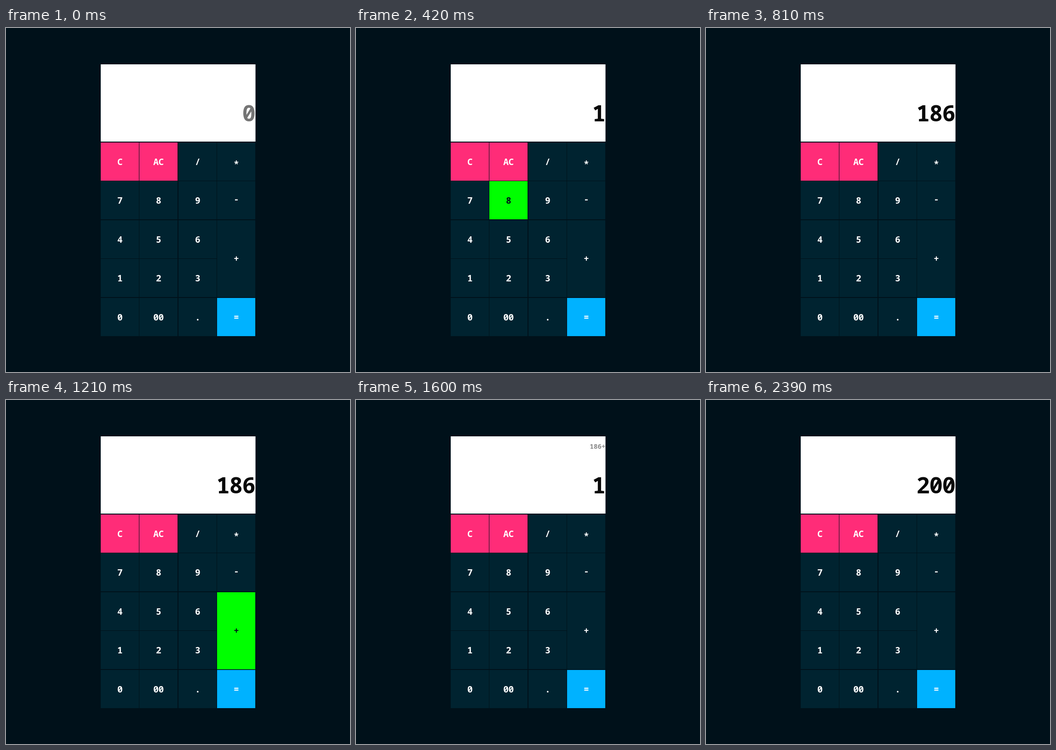
An HTML page that plays this animation: 748 by 748 pixels, repeating every 2790 ms.

```html
<!DOCTYPE html>
<html lang="en">
<head>
<meta charset="utf-8">
<title>Calculator</title>
<style>
  html, body { margin: 0; width: 100%; height: 100%; overflow: hidden; background: #00111a; }
  svg { display: block; width: 100vw; height: 100vh; }
  text { font: bold 19.5px "Noto Sans Mono", monospace; letter-spacing: -.027em; }
  .key rect { fill: #002330; }
  .key text { fill: #fff; text-anchor: middle; }
  .key.clear rect { fill: #ff2c78; }
  .key.equals rect { fill: #00b2ff; }
  .key.down rect { fill: #0f0; }
  .key.down text { fill: #00111a; }
  #total, #entry { text-anchor: end; }
  #total { font-size: 14.7px; fill: #8c8c8c; }
  #entry { font-size: 49px; fill: #0a0a0a; }
  #entry.empty { fill: #757575; }
</style>
</head>
<body>
<svg viewBox="0 0 748 748">
  <rect x="206" y="79" width="336.5" height="168" fill="#fff"/>
  <text id="total" x="542" y="106"></text>
  <text id="entry" x="541.7" y="202.7"></text>
  <g id="keys"></g>
</svg>
<script>
const LOOP = 2790, STEP = 84.5, SIZE = 83;
const ROWS = ["C AC / *", "7 8 9 -", "4 5 6 +", "1 2 3", "0 00 . ="];
const LIFT = { "-": -2.5, "*": 5, "+": -0.5 };

// start time, pressed key, running total, entry
const STATES = [
  [0, "", "", ""], [160, "1", "", ""], [290, "", "", "1"],
  [420, "8", "", "1"], [550, "", "", "18"], [680, "6", "", "18"],
  [810, "", "", "186"], [1210, "+", "", "186"], [1340, "", "186+", ""],
  [1470, "1", "186+", ""], [1600, "", "186+", "1"], [1730, "4", "186+", "1"],
  [1860, "", "186+", "14"], [2260, "=", "186+", "14"], [2390, "", "", "200"]
];

const total = document.getElementById("total");
const entry = document.getElementById("entry");
const keyBox = document.getElementById("keys");
const keys = {};

function add(parent, tag, attrs, content = "") {
  const el = document.createElementNS("http://www.w3.org/2000/svg", tag);
  for (const name in attrs) el.setAttribute(name, attrs[name]);
  el.textContent = content;
  return parent.appendChild(el);
}

function addKey(label, col, row) {
  const x = Math.round(205.75 + col * STEP);
  const y = Math.round(248.6 + row * STEP);
  const height = label === "+" ? SIZE + STEP : SIZE;
  const kind = label.includes("C") ? " clear" : label === "=" ? " equals" : "";
  const key = add(keyBox, "g", { class: "key" + kind });
  add(key, "rect", { x, y, width: SIZE, height });
  add(key, "text", { x: x + SIZE / 2, y: y + height / 2 + 7 + (LIFT[label] || 0) }, label);
  keys[label] = key;
}

ROWS.forEach((line, row) => line.split(" ").forEach((label, col) => addKey(label, col, row)));

let shown;
function draw(now) {
  const time = now % LOOP;
  const state = STATES.findLast(([start]) => start <= time);
  if (state !== shown) {
    const [, pressed, sum, value] = shown = state;
    for (const label in keys) keys[label].classList.toggle("down", label === pressed);
    total.textContent = sum;
    entry.textContent = value || "0";
    entry.classList.toggle("empty", !value);
  }
  requestAnimationFrame(draw);
}
draw(0);
</script>
</body>
</html>
```
